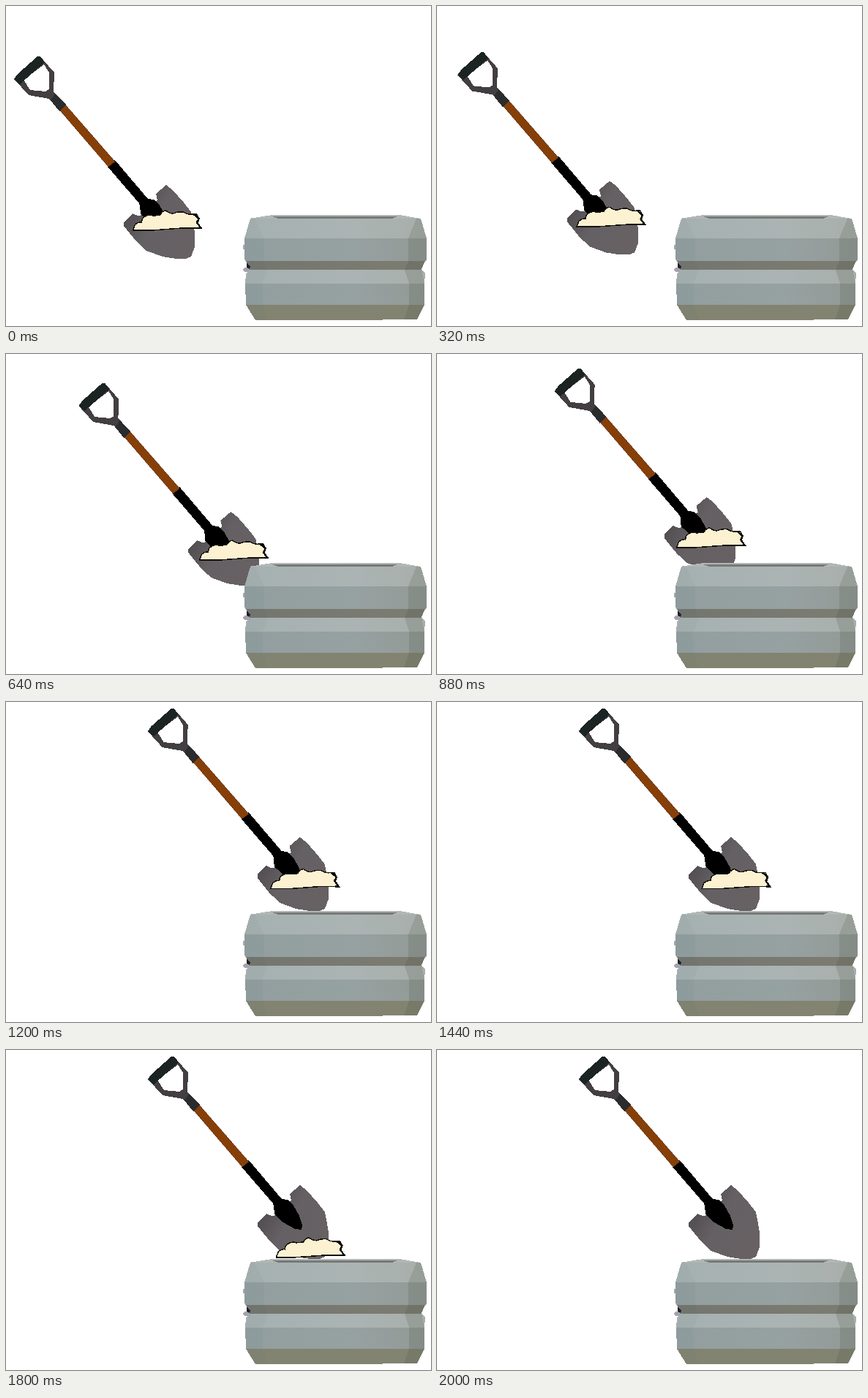
Animation, 581 px wide and 438 px high, one loop 3970 ms. Source, as an HTML page:

```html
<!DOCTYPE html>
<html lang="en">
<head>
<meta charset="utf-8">
<title>Shovel and trough</title>
<style>
html, body { margin: 0; width: 100%; height: 100%; overflow: hidden; background: #fff; }
svg { display: block; width: 100%; height: 100%; shape-rendering: crispEdges; }
</style>
</head>
<body>
<svg viewBox="0 0 581 438">
  <defs>
    <linearGradient id="steel" x1="0" y1=".2" x2="1" y2=".8">
      <stop offset="0" stop-color="#4b4649"/><stop offset=".45" stop-color="#656063"/><stop offset="1" stop-color="#676164"/>
    </linearGradient>
    <linearGradient id="light" x1="0" x2="1">
      <stop offset="0" stop-color="#a5b0b1"/><stop offset=".6" stop-color="#abb4b3"/><stop offset="1" stop-color="#a8aeaa"/>
    </linearGradient>
    <linearGradient id="mid" x1="0" x2="1">
      <stop offset="0" stop-color="#929e9f"/><stop offset=".6" stop-color="#96a1a1"/><stop offset="1" stop-color="#939a96"/>
    </linearGradient>
    <linearGradient id="low" x1="0" x2="1">
      <stop offset="0" stop-color="#74766f"/><stop offset="1" stop-color="#7c7c71"/>
    </linearGradient>
  </defs>

  <g id="shovel">
    <path fill="url(#steel)" d="M403 185L412 192L427 209L437 222L440 238L442 250L442 270L437 283L430 286L417 286L398 283L376 275L362 262L345 241L345 236L357 224L364 227L372 226L386 208L391 206L389 197Z"/>
    <path fill="#000" d="M323 160L333 151L378 204L386 205L394 213L402 227L406 240L405 246L396 245L380 236L368 225L367 213L366 210Z"/>
    <path fill="#873f08" stroke="#55290c" stroke-width=".7" d="M257 82L265 75L333 153L324 160Z"/>
    <path fill="#433e41" fill-rule="evenodd" d="M230 9L235 14L250 31L249 57L266 75L257 84L243 67L215 62L195 40ZM208 41L236 20L243 31L243 54L238 57L217 55Z"/>
    <path fill="#2b2c2d" d="M251 60L266 75L257 84L245 69Z"/>
    <path fill="#1b2422" d="M195 40L200 33L227 9L231 9L237 17L203 47Z"/>
  </g>

  <g id="mound">
    <path fill="#fcf2d1" stroke="#15110d" stroke-width="1.5" stroke-linejoin="round" d="M174 307L177 299Q182 295 186 296Q186 290 191 288Q196 285 201 287Q206 287 211 286Q215 280 219 280Q224 284 229 284Q236 281 243 282Q249 286 255 285L261 285L264 291L261 296L267 304L241 304L200 307Z"/>
    <path fill="none" stroke="#000" stroke-width="2.4" d="M257 285L264 291L262 297L267 304H262"/>
  </g>

  <g id="trough">
    <ellipse cx="327" cy="330" rx="3.5" ry="3.5" fill="#a5a9ac"/>
    <ellipse cx="330" cy="361" rx="6" ry="3.5" fill="#a3a3ae"/>
    <path fill="#b1b7b5" d="M332 291L364 286H538L567 291Z"/>
    <path fill="#777977" d="M363 288H535L528 291H372Z"/>
    <path fill="url(#light)" d="M334 291H567L575 318H326Z"/>
    <path fill="url(#mid)" d="M326 318H575V347L573 350H328L326 346Z"/>
    <path fill="url(#low)" d="M328 349H573L567 362H334Z"/>
    <path fill="url(#light)" d="M333 361H568L573 366L572 380H327L328 366Z"/>
    <path fill="url(#mid)" d="M327 380H572V409H328Z"/>
    <path fill="#80826f" fill-opacity=".98" d="M328 409H572L562 429L470 430H341Z"/>
    <g fill="#414b49" fill-opacity=".04">
      <path d="M334 291H340L353 318V349L358 362H334L326 346V318Z"/>
      <path d="M333 362H358L351 380V409L358 430H341L328 409L327 380Z"/>
    </g>
    <g fill="#45463c" fill-opacity=".17">
      <path d="M567 291H561L550 318V349L545 361H567L575 347V318Z"/>
      <path d="M568 361H545L551 380V409L544 429H562L572 409V380Z"/>
    </g>
    <path fill="#22202a" d="M329 352L334 357L333 360L329 358Z"/>
  </g>
</svg>
<script>
const LOOP = 3970, STEP = 40, END = 2000;
const shovel = document.getElementById("shovel");
const mound = document.getElementById("mound");

const easeInOut = u => {
  u = Math.min(1, Math.max(0, u));
  return u < .5 ? 2 * u * u : 1 - 2 * (1 - u) ** 2;
};
const place = (node, x, y) =>
  node.setAttribute("transform", `translate(${x.toFixed(2)} ${y.toFixed(2)})`);

function draw(now) {
  const t = Math.min(END, Math.floor((now % LOOP) / STEP) * STEP);
  const carry = easeInOut((t - 70) / 1160);
  const fall = 9.5 * (Math.max(0, t - 1420) / 220) ** 2;
  place(shovel, -1 - 183 * (1 - carry), 60 * (1 - carry));
  place(mound, -.5 + 188.5 * carry + fall * .26, -51.5 * carry + fall);
  mound.style.display = t < END ? "" : "none";
}

const start = performance.now();
function tick() {
  draw(performance.now() - start);
  requestAnimationFrame(tick);
}
tick();
</script>
</body>
</html>
```
